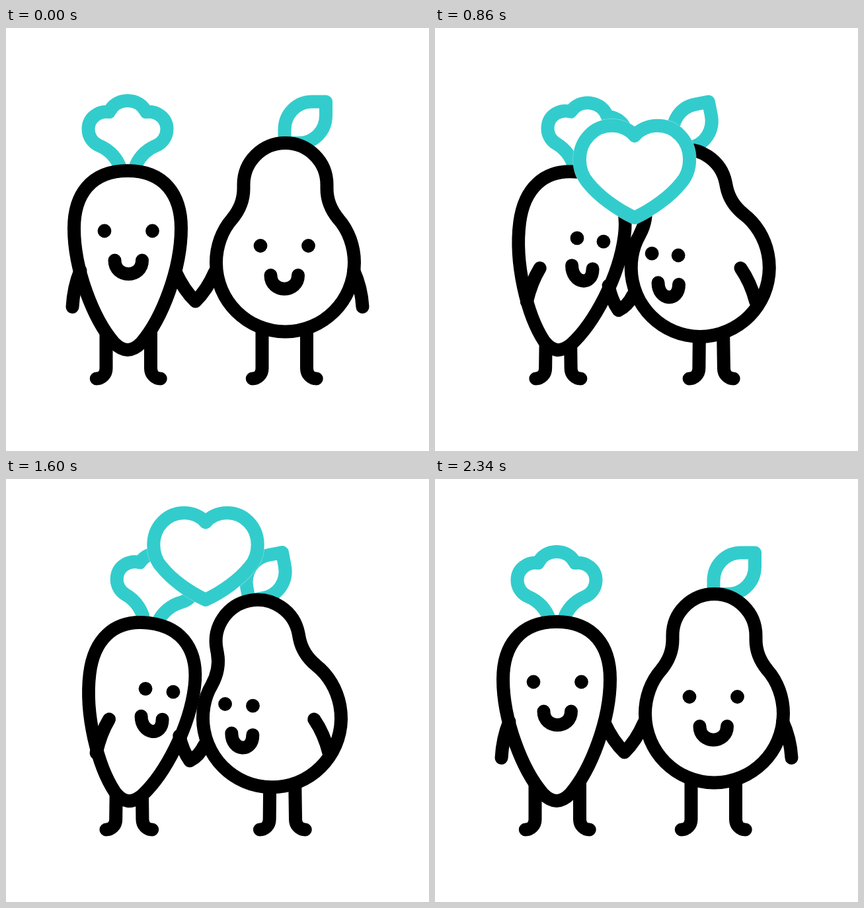
An HTML page with a canvas for the animation above (2.4 s loop, 640x640 px).

```html
<!DOCTYPE html>
<html lang="en">
<head>
<meta charset="utf-8">
<title>Carrot and pear</title>
<style>
  html, body { margin: 0; width: 100%; height: 100%; overflow: hidden; background: #fff; }
  canvas { display: block; width: 640px; height: 640px; }
</style>
</head>
<body>
<canvas id="stage" width="640" height="640"></canvas>
<script>
const ctx = document.getElementById('stage').getContext('2d');
const LOOP = 2400, LEAN_END = 1200, REST_START = 2340;
const BLACK = '#000', TEAL = '#33cccc', LINE = 20;

const mix = (a, b, k) => a + (b - a) * k;
const smooth = u => u * u * (3 - 2 * u);
const ramp = (t, from, to) => smooth(Math.min(1, Math.max(0, (t - from) / (to - from))));

// A right half, drawn around x = 0, joined with its mirror image
function symmetric(half, x, y = 0, scale = 1) {
  const path = new Path2D(), right = new Path2D(half);
  for (const side of [1, -1]) path.addPath(right, new DOMMatrix([side * scale, 0, 0, scale, x, y]));
  return path;
}

const carrotBody = symmetric('M0 216 C56 216 81 253 81 303 C81 365 52 440 21 476 C12 485 6 487 0 487', 184);
const carrotLeaf = symmetric(
  'M0 110 C13 110 23 117 28 127 C44 125 59.5 136 59.5 153 C59.5 164 53 174 43 178 C26 185 15 199 11 212', 184);
const pearBody = symmetric(
  'M0 174 C34.5 174 63 202 63 237 V243 C63 262 70.5 277 80.5 289' +
  'C95.5 306 104.5 330 104.5 355 C104.5 413 57.5 459.5 0 459.5', 422.5);
const pearLeaf = new Path2D('M421.5 174 V154 C421.5 130 440 111.5 463 111.5 H484 V132 C484 156 466 174 443 174 Z');
const heartHalf = 'M0 -55 C7 -64 20 -70.5 35 -70.5 C62 -70.5 84 -48 84 -19 C84 -5 79 8 71 17 C55 37 28 57 0 70';

// cubic-bezier(.8, 0, .2, 1)
function swing(u) {
  let lo = 0, hi = 1;
  for (let i = 0; i < 24; i++) {
    const s = (lo + hi) / 2, r = 1 - s;
    if (2.4 * r * r * s + 0.6 * r * s * s + s * s * s < u) lo = s; else hi = s;
  }
  return smooth(lo);
}

function leanAt(t) {
  if (t < LEAN_END) return swing(t / LEAN_END);
  return t < REST_START ? 1 - swing((t - LEAN_END) / (REST_START - LEAN_END)) : 0;
}

function outline(path, color, filled, width = LINE) {
  if (filled) { ctx.fillStyle = '#fff'; ctx.fill(path); }
  ctx.strokeStyle = color;
  ctx.lineWidth = width;
  ctx.stroke(path);
}

function tilted(x, y, degrees, squeeze, draw) {
  ctx.save();
  ctx.translate(x, y);
  ctx.rotate(degrees * Math.PI / 180);
  ctx.scale(squeeze, 1);
  ctx.translate(-x, -y);
  draw();
  ctx.restore();
}

function drawLeg(x, side, slide) {
  const ankle = x + slide, foot = ankle + side * 14.75;
  const path = new Path2D();
  path.moveTo(x + slide * 1.06, 446);
  path.lineTo(ankle, 515);
  path.bezierCurveTo(ankle, 524, mix(ankle, foot, 0.45), 530.5, foot, 530.5);
  outline(path, BLACK);
}

function drawFreeArm(shoulder, hand, k) {
  const path = new Path2D();
  path.moveTo(shoulder, 367 - 4 * k);
  path.quadraticCurveTo(mix(shoulder, hand, 0.86 - 0.22 * k), 392 - 8 * k, hand, 422 - 8.5 * k);
  outline(path, BLACK);
}

function drawHeldHands(k) {
  const x = 286.5 - 9.5 * k, y = 413.5 + 14.5 * k;
  const x1 = 257 + 6 * k, y1 = 370 + 21 * k, x2 = 316 - 18 * k, y2 = 369 + 38 * k;
  const path = new Path2D();
  path.moveTo(x1, y1);
  path.quadraticCurveTo((x1 + x) / 2 - 3, (y1 + y) / 2 + 4, x, y);
  path.quadraticCurveTo((x2 + x) / 2 + 3, (y2 + y) / 2 + 5, x2, y2);
  outline(path, BLACK);
}

// Turning the head shifts the eyes and mouth and narrows both
function drawFace(x, y, eyes, mouth, tilt, k) {
  const eyeGap = 36.25 * (1 - 0.48 * k), mouthGap = 20.75 * (1 - 0.26 * k);
  ctx.fillStyle = BLACK;
  for (const side of [-1, 1]) {
    ctx.beginPath();
    ctx.arc(x + eyes.x * k + side * eyeGap, y + eyes.y * k + side * tilt * k, 10.4, 0, Math.PI * 2);
    ctx.fill();
  }
  const mx = x + mouth.x * k, my = y + 44.5 + mouth.y * k, drop = 27.5, dy = tilt * k;
  const path = new Path2D();
  path.moveTo(mx - mouthGap, my - dy);
  path.bezierCurveTo(mx - mouthGap, my - dy + drop, mx + mouthGap, my + dy + drop, mx + mouthGap, my + dy);
  outline(path, BLACK);
}

// Pops up, rises steadily, dips once in size and shrinks away
function drawHeart(t) {
  const dip = 0.33 * ramp(Math.abs(t - 1415), 250, 0);
  const size = ramp(t, 345, 745) * (1 - dip) * ramp(t, 2180, 1830);
  if (size < 0.01) return;
  const y = Math.max(48, 236.5 - 0.135 * (t - 640)) + 11 * size;
  const path = symmetric(heartHalf, 302, y, size * 0.99);
  const width = Math.min(LINE, 70 * size);
  // faint light seam where the heart crosses the leaves
  outline(path, 'rgba(255,255,255,.5)', true, width + 1);
  outline(path, TEAL, false, width);
}

function draw(t) {
  const k = leanAt(t);
  ctx.fillStyle = '#fff';
  ctx.fillRect(0, 0, 640, 640);
  ctx.lineCap = ctx.lineJoin = 'round';

  drawLeg(151.5, -1, 16.7 * k);
  drawLeg(219, 1, -14.3 * k);
  drawLeg(387.5, -1, 12.7 * k);
  drawLeg(455, 1, -19.3 * k);

  tilted(184, 487, 8.4 * k, 1, () => outline(carrotLeaf, TEAL));
  tilted(184, 487, 7.8 * k, 1 - 0.015 * k, () => outline(carrotBody, BLACK, true));
  tilted(449, 466, -12.1 * k, 1, () => {
    outline(pearLeaf, TEAL);
    outline(pearBody, BLACK, true);
  });

  drawFreeArm(112.5 + 49.5 * k, 100.5 + 41 * k, k);
  drawFreeArm(526 - 68 * k, 539.5 - 58 * k, k);
  drawHeldHands(k);
  drawFace(185.25, 307, { x: 53.2, y: 14.5 }, { x: 40.2, y: 11 }, 2.8, k);
  drawFace(421.25, 329.5, { x: -78.2, y: 14 }, { x: -72.7, y: 13.5 }, 1.5, k);
  drawHeart(t);
}

const start = performance.now();
function tick() {
  draw((performance.now() - start) % LOOP);
  requestAnimationFrame(tick);
}
tick();
</script>
</body>
</html>
```
